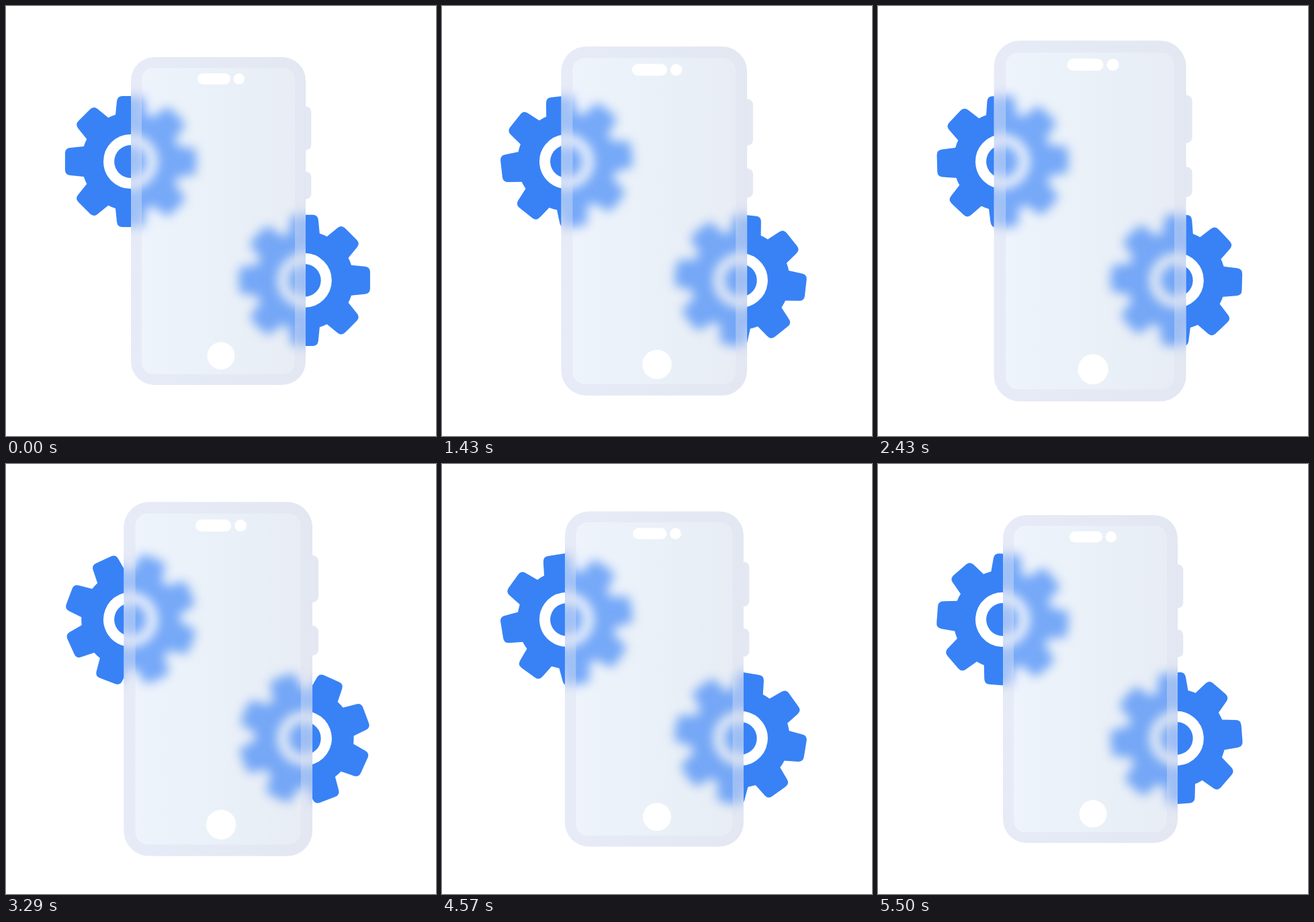
Recreate the animation shown at these times as an HTML page. Size 640 by 640 pixels, loop 5570 ms.

```html
<!DOCTYPE html>
<html lang="en">
<head>
<meta charset="utf-8">
<title>Phone and gears</title>
<style>
  html, body { margin: 0; width: 100%; height: 100%; overflow: hidden; background: #fff; }
  svg { display: block; width: 100vw; height: 100vh; }
  .gear { fill: #3882f6; }
  .gear .rim { fill: none; stroke: #3882f6; stroke-width: 32.6; }
</style>
</head>
<body>
<svg viewBox="0 0 640 640">
  <defs>
    <linearGradient id="bezel">
      <stop offset="0" stop-color="#e7ebf7"/>
      <stop offset="1" stop-color="#e3e7f2"/>
    </linearGradient>
    <linearGradient id="glass">
      <stop offset="0" stop-color="#eef3fc"/>
      <stop offset=".3" stop-color="#ebf2f9"/>
      <stop offset="1" stop-color="#e8edf5"/>
    </linearGradient>
    <filter id="blur" filterUnits="userSpaceOnUse" x="0" y="0" width="640" height="640"
            color-interpolation-filters="sRGB">
      <feGaussianBlur stdDeviation="8"/>
    </filter>

    <rect id="body" x="186" y="76" width="260" height="488" rx="35"/>
    <rect id="screen" x="202" y="92" width="228" height="456" rx="17"/>

    <path id="tooth" d="M-22.7-68L-20.5-90Q-19.7-97.6-12.2-97.6H12.2Q19.7-97.6 20.5-90L22.7-68Z"/>
    <g id="pair"><use href="#tooth"/><use href="#tooth" transform="rotate(180)"/></g>
    <g id="gear" class="gear">
      <use href="#pair"/>
      <use href="#pair" transform="rotate(45)"/>
      <use href="#pair" transform="rotate(90)"/>
      <use href="#pair" transform="rotate(135)"/>
      <circle class="rim" r="56.8"/>
      <circle r="24.4"/>
    </g>
    <g id="gears">
      <use id="left" href="#gear"/>
      <use id="right" href="#gear"/>
    </g>

    <!-- How strongly the gears show through bezel and glass -->
    <mask id="frost" maskUnits="userSpaceOnUse" x="0" y="0" width="640" height="640">
      <g class="phone" fill="#fff">
        <use href="#body" opacity=".4"/>
        <use href="#screen" opacity=".43"/>
      </g>
    </mask>
  </defs>

  <use href="#gears"/>
  <g class="phone">
    <g fill="#e4e8f3">
      <rect x="430" y="149.5" width="24.3" height="65" rx="8"/>
      <rect x="430" y="246.5" width="24.3" height="41" rx="8"/>
    </g>
    <use href="#body" fill="url(#bezel)"/>
    <use href="#screen" fill="url(#glass)"/>
  </g>
  <g mask="url(#frost)"><use href="#gears" filter="url(#blur)"/></g>
  <g class="phone" fill="#fff">
    <rect x="285" y="100.3" width="49" height="16.4" rx="8.2"/>
    <circle cx="346.8" cy="108.5" r="8.2"/>
    <circle cx="320" cy="520.6" r="20.5"/>
  </g>
</svg>
<script>
  const LOOP = 5570, SHOWN_FPS = 14, BASE_FPS = 30;
  const PEAK = 72, END = 166; // in base ticks
  const phones = document.querySelectorAll('.phone');
  const left = document.getElementById('left');
  const right = document.getElementById('right');
  const ease = s => s * s * (3 - 2 * s);
  let last = -1;

  // The motion runs on 30 ticks a second but is shown 14 times a second.
  function tickAt(ms) {
    const step = Math.floor((Math.floor(ms / 10) + 0.5) * SHOWN_FPS / 100);
    return Math.round(step * BASE_FPS / SHOWN_FPS);
  }

  function draw(tick) {
    const turn = 720 * tick / END;
    const swell = ease(tick < PEAK ? tick / PEAK : (END - tick) / (END - PEAK));
    const scale = 1 + 0.1 * swell;
    left.setAttribute('transform', `translate(185.5 231.5) rotate(${-turn})`);
    right.setAttribute('transform', `translate(444.3 408.3) rotate(${turn})`);
    for (const p of phones) {
      p.setAttribute('transform', `translate(320 320) scale(${scale}) translate(-320 -320)`);
    }
  }

  function loop() {
    const tick = tickAt(performance.now() % LOOP);
    if (tick !== last) draw(last = tick);
    requestAnimationFrame(loop);
  }
  loop();
</script>
</body>
</html>
```
